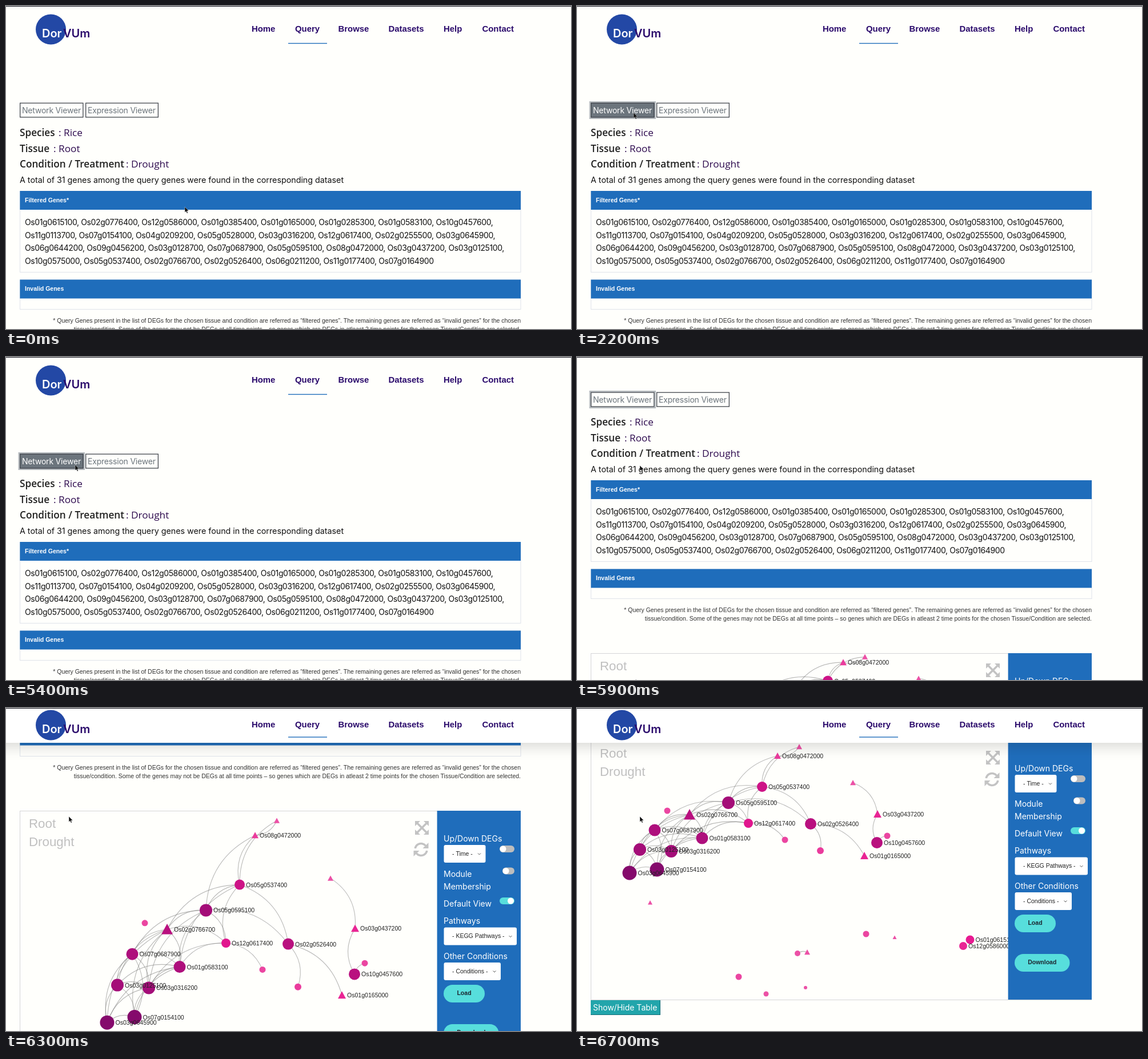
Recreate the animation shown at these times as an HTML page with a canvas. Size 989 by 566 pixels, loop 8000 ms.

```html
<!DOCTYPE html>
<html lang="en">
<head>
<meta charset="utf-8">
<title>Gene network viewer</title>
<style>
  html, body { margin: 0; width: 100%; height: 100%; overflow: hidden; background: #fffffc; }
  canvas { display: block; }
</style>
</head>
<body>
<canvas id="stage" width="989" height="566"></canvas>
<script>
const ctx = document.getElementById('stage').getContext('2d');
const LOOP = 8000, STEP = 100;
const ARIAL = '"Liberation Sans", Arial, sans-serif';
const ROUND = 'Inter, sans-serif';
const HUMAN = '"Open Sans", sans-serif';
const PAGE = '#fffffc', BLUE = '#1f6dbb', PURPLE = '#2a0a6b', GREY = '#6c757d', AQUA = '#57dedc';
const PANEL_TOP = 627, PANEL_HEIGHT = 454;

// Keys are [time, ...values]; values are linear between keys.
function track(keys, t) {
  if (t <= keys[0][0]) return keys[0].slice(1);
  const next = keys.findIndex(k => k[0] > t);
  if (next < 0) return keys[keys.length - 1].slice(1);
  const a = keys[next - 1], b = keys[next], p = (t - a[0]) / (b[0] - a[0]);
  return a.slice(1).map((v, i) => v + (b[i + 1] - v) * p);
}

const cursorKeys = [
  [600, 313, 352], [700, 271, 317], [800, 271, 317], [1000, 179, 246], [1100, 179, 246], [1800, 99, 187],
  [4500, 99, 187], [4800, 150, 176], [5100, 163, 208], [5400, 121, 189], [5500, 110, 190]
];
const scrollKeys = [[5800, 0], [5900, 108], [6100, 315], [6300, 447], [6500, 533], [6700, 570]];
const stickyKeys = [[6000, 0], [6100, 0.37], [6300, 1]];
// The network starts shifted right and stretched, then settles: [time, shift, stretch].
const settleKeys = [[5900, 115, 0.6], [6100, 130, 1.6], [6300, 85, 1.6], [6700, 0, 1]];

const circle = (x, y, r, gene) => ({ x, y, r, gene });
const triangle = (x, y, r, gene) => ({ x, y, r, gene, triangle: true });

const hubs = [
  circle(324, 81, 9, 'Os05g0537400'), circle(265, 109, 11, 'Os05g0595100'),
  triangle(197, 130, 10, 'Os02g0766700'), circle(300, 145, 8, 'Os12g0617400'),
  circle(136, 157, 10.5, 'Os07g0687900'), circle(219, 171, 10.5, 'Os01g0583100'),
  circle(110, 191, 11, 'Os03g0125100'), circle(165, 194, 11, 'Os03g0316200'),
  circle(140, 226, 12.5, 'Os07g0154100'), circle(92, 232, 12.5, 'Os03g0645900')
];
const top1 = triangle(351, 27, 6, 'Os08g0472000'), top2 = triangle(389, 11, 5);
const middle = circle(409, 146, 10, 'Os02g0526400'), right = triangle(503, 202, 7, 'Os01g0165000');
const leaf1 = circle(364, 174, 5.5), leaf2 = circle(426, 193, 6);
const branch = [
  triangle(483, 74, 5), triangle(526, 129, 7, 'Os03g0437200'),
  circle(525, 179, 10, 'Os10g0457600'), circle(543, 167, 5.5)
];
const pair = [circle(386, 373, 5), triangle(403, 371, 5)];
const strays = [
  circle(158, 123, 5.5), triangle(128, 284, 4), circle(506, 339, 5.5), triangle(556, 345, 3.5),
  circle(688, 349, 7.5, 'Os01g0615100'), circle(676, 360, 7, 'Os12g0586000'),
  circle(283, 414, 5.5), circle(331, 444, 4.5), circle(400, 433, 3)
];
const nodes = [...hubs, top1, top2, middle, right, leaf1, leaf2, ...branch, ...pair, ...strays];

const edges = [
  [hubs[1], top1], [hubs[0], top1], [top2, top1], [hubs[0], top2], [hubs[1], middle], [hubs[0], middle],
  [middle, right], [middle, leaf2], [hubs[3], leaf1],
  [branch[0], branch[1]], [branch[2], branch[1]], [branch[2], branch[3]], pair
];
// Neighbouring hubs are all linked, left to right.
for (const a of hubs) {
  for (const b of hubs) {
    if (a.x < b.x && Math.hypot(a.x - b.x, a.y - b.y) < 150) edges.push([a, b]);
  }
}

// Larger nodes are darker and closer to purple.
function nodeColor({ r }) {
  const size = Math.max(0, r - 5) / 7.5;
  return `hsl(${327 - 15 * size * size} ${80 + 6 * size}% ${62 - 34 * size}%)`;
}

const geneLines = [
  'Os01g0615100, Os02g0776400, Os12g0586000, Os01g0385400, Os01g0165000, Os01g0285300, Os01g0583100, Os10g0457600,',
  'Os11g0113700, Os07g0154100, Os04g0209200, Os05g0528000, Os03g0316200, Os12g0617400, Os02g0255500, Os03g0645900,',
  'Os06g0644200, Os09g0456200, Os03g0128700, Os07g0687900, Os05g0595100, Os08g0472000, Os03g0437200, Os03g0125100,',
  'Os10g0575000, Os05g0537400, Os02g0766700, Os02g0526400, Os06g0211200, Os11g0177400, Os07g0164900'
];
const notes = [
  '* Query Genes present in the list of DEGs for the chosen tissue and condition are referred as “filtered genes”. The remaining genes are referred as “invalid genes” for the chosen',
  'tissue/condition. Some of the genes may not be DEGs at all time points – so genes which are DEGs in atleast 2 time points for the chosen Tissue/Condition are selected.'
];

function text(str, x, y, font, color, align = 'left', spacing = 0) {
  ctx.font = font;
  ctx.fillStyle = color;
  ctx.textAlign = align;
  ctx.letterSpacing = spacing + 'px';
  ctx.fillText(str, x, y);
}

function rect(x, y, w, h, color) {
  ctx.fillStyle = color;
  ctx.fillRect(x, y, w, h);
}

function frame(x, y, w, h, color, width = 1) {
  ctx.strokeStyle = color;
  ctx.lineWidth = width;
  ctx.strokeRect(x + width / 2, y + width / 2, w - width, h - width);
}

function pill(x, y, w, h, r, color) {
  ctx.fillStyle = color;
  ctx.beginPath();
  ctx.roundRect(x, y, w, h, r);
  ctx.fill();
}

function disc(x, y, r, color) {
  ctx.fillStyle = color;
  ctx.beginPath();
  ctx.arc(x, y, r, 0, Math.PI * 2);
  ctx.fill();
}

function polygon(points, color) {
  ctx.fillStyle = color;
  ctx.beginPath();
  points.forEach(([x, y]) => ctx.lineTo(x, y));
  ctx.closePath();
  ctx.fill();
}

function at(x, y, draw) {
  ctx.save();
  ctx.translate(x, y);
  draw();
  ctx.restore();
}

function drawHeader(underlineY) {
  disc(78.5, 41, 26.5, '#2348a5');
  text('Dor', 63, 55, '600 20px ' + ROUND, '#fff');
  text('VUm', 100, 55, '600 20px ' + ROUND, PURPLE);
  const items = { Home: 430, Query: 506, Browse: 581.5, Datasets: 669.5, Help: 766, Contact: 833.5 };
  for (const name in items) text(name, items[name], 45, 'bold 14.9px ' + ARIAL, PURPLE);
  rect(494, underlineY, 68, 1.4, BLUE);
}

function drawStickyHeader(p) {
  if (!p) return;
  at(0, (p - 1) * 61, () => {
    ctx.globalAlpha = p;
    ctx.shadowColor = 'rgba(0,0,0,.16)';
    ctx.shadowBlur = 24;
    ctx.shadowOffsetY = 6;
    rect(-30, -30, 1049, 91, '#fff');
    ctx.shadowColor = 'transparent';
    ctx.translate(0, -11);
    drawHeader(61.3);
  });
}

function drawButton(label, x, w, cursor, focused) {
  const y = 169.5, h = 26;
  const hover = cursor.x >= x && cursor.x < x + w && cursor.y >= y && cursor.y < y + h;
  if (focused) rect(x - 2.5, y - 2.5, w + 5, h + 5, '#b5babe');
  rect(x, y, w, h, hover ? GREY : PAGE);
  frame(x, y, w, h, '#42464e', 1.3);
  text(label, x + 4, 188, '14px ' + ROUND, hover ? '#fff' : GREY, 'left', -0.2);
}

function drawTable(title, y, height) {
  frame(24, y, 877.5, height, '#dfe3ea');
  rect(24.4, y, 876.6, 33, BLUE);
  text(title, 33, y + 19.5, 'bold 10.5px ' + ARIAL, '#fff');
}

function drawResults(cursor, focused) {
  drawButton('Network Viewer', 24, 111.5, cursor, focused);
  drawButton('Expression Viewer', 139, 128, cursor, false);
  [['Species', ': Rice', 92], ['Tissue', ': Root', 83], ['Condition / Treatment', ': Drought', 210]]
    .forEach(([label, value, x], i) => {
      const y = 228 + i * 27.6;
      text(label, 24, y, '600 17.2px ' + HUMAN, '#212121');
      text(value, x, y, '17.2px ' + HUMAN, '#2d0a4e');
    });
  text('A total of 31 genes among the query genes were found in the corresponding dataset',
    24, 310, '14.27px ' + ROUND, '#111');
  drawTable('Filtered Genes*', 324, 143);
  geneLines.forEach((line, i) => text(line, 33, 384 + i * 22.6, '14px ' + ROUND, '#111', 'left', -0.39));
  drawTable('Invalid Genes', 479.5, 52.5);
  notes.forEach((line, i) => text(line, 901, 554.5 + i * 15.2, '10.47px ' + ARIAL, '#333', 'right'));
}

function drawGraph(t) {
  const [shift, stretch] = track(settleKeys, t);
  const place = n => [n.x + shift, n.y * stretch];
  const bend = 0.3;
  ctx.strokeStyle = 'rgba(130,130,130,.55)';
  ctx.lineWidth = 1.1;
  for (const [from, to] of edges) {
    const [ax, ay] = place(from), [bx, by] = place(to);
    ctx.beginPath();
    ctx.moveTo(ax, ay);
    ctx.quadraticCurveTo((ax + bx) / 2 + (by - ay) * bend, (ay + by) / 2 - (bx - ax) * bend, bx, by);
    ctx.stroke();
  }
  for (const n of nodes) {
    const [x, y] = place(n), { r } = n, base = y + r * 0.85;
    if (n.triangle) polygon([[x, y - r], [x + r, base], [x - r, base]], nodeColor(n));
    else disc(x, y, r, nodeColor(n));
  }
  for (const n of nodes) {
    const [x, y] = place(n);
    if (n.gene) text(n.gene, x + n.r + 2, y + 4, '10.55px ' + ARIAL, '#222');
  }
}

function drawIcons() {
  const color = '#c3c3c3';
  ctx.strokeStyle = color;
  ctx.lineWidth = 3.6;
  at(728, 30, () => {
    for (let i = 0; i < 4; i++) {
      ctx.beginPath();
      ctx.moveTo(0, 0);
      ctx.lineTo(9, 9);
      ctx.stroke();
      polygon([[12, 12], [12, 3], [3, 12]], color);
      ctx.rotate(Math.PI / 2);
    }
  });
  at(726.5, 68, () => {
    for (let i = 0; i < 2; i++) {
      ctx.beginPath();
      ctx.arc(0, 0, 10.5, Math.PI * 1.06, Math.PI * 1.78);
      ctx.stroke();
      polygon([[13, -12], [13, -2], [3, -2]], color);
      ctx.rotate(Math.PI);
    }
  });
}

function drawSelect(label, y, w) {
  pill(766.5, y, w, 31, 3, '#fff');
  text(label, 781, y + 18.5, '10.5px ' + ARIAL, '#222');
  const x = 766.5 + w - 11;
  ctx.strokeStyle = '#555';
  ctx.lineWidth = 1;
  ctx.beginPath();
  ctx.moveTo(x - 2.5, y + 14.5);
  ctx.lineTo(x, y + 17);
  ctx.lineTo(x + 2.5, y + 14.5);
  ctx.stroke();
}

function drawToggle(x, y, on) {
  pill(x, y - 6, 890 - x, 12, 6, on ? AQUA : '#bdbdbd');
  disc(on ? 883.5 : x + 6, y, 5.5, '#fff');
}

function drawAction(label, y, w) {
  pill(766, y, w, 31, 15.5, AQUA);
  text(label, 766 + w / 2, y + 17.5, 'bold 10.5px ' + ARIAL, '#1c2630', 'center');
}

function drawSidebar() {
  rect(754.6, 0, 146.4, PANEL_HEIGHT, BLUE);
  const labels = {
    'Up/Down DEGs': 54, 'Module': 116, 'Membership': 138, 'Default View': 168, 'Pathways': 198, 'Other Conditions': 260
  };
  for (const label in labels) text(label, 766, labels[label], '14px ' + ROUND, '#fff');
  drawSelect('- Time -', 60, 73);
  drawSelect('- KEGG Pathways -', 204.5, 127.5);
  drawSelect('- Conditions -', 266, 99.5);
  drawToggle(864, 67, false);
  drawToggle(869, 105.5, false);
  drawToggle(864, 158, true);
  drawAction('Load', 305, 72);
  drawAction('Download', 374, 96.5);
}

function drawPanel(t) {
  ctx.save();
  ctx.beginPath();
  ctx.rect(24, 0, 731, PANEL_HEIGHT);
  ctx.clip();
  text('Root', 40, 30, '22.3px ' + ARIAL, '#c0c0c0');
  text('Drought', 40, 62, '22.3px ' + ARIAL, '#c0c0c0');
  drawGraph(t);
  drawIcons();
  ctx.restore();
  frame(24, 0, 877, PANEL_HEIGHT + 1, '#d5d5d8');
  drawSidebar();
  rect(24, 455, 122, 26, '#176f78');
  rect(24, 455, 121, 25, '#22a5ab');
  text('Show/Hide Table', 28, 472.5, '14px ' + ROUND, '#fff');
}

function drawCursor(x, y) {
  at(x, y, () => {
    polygon([[0, 0], [0, 9.6], [2.2, 7.7], [3.8, 11.2], [5.3, 10.5], [3.8, 7.1], [6.8, 6.9]], '#111');
    ctx.strokeStyle = 'rgba(255,255,255,.6)';
    ctx.lineWidth = 0.6;
    ctx.stroke();
  });
}

function draw(t) {
  const [x, y] = track(cursorKeys, t);
  const [scroll] = track(scrollKeys, t);
  rect(0, 0, 989, 566, PAGE);
  at(0, -scroll, () => {
    drawHeader(64.8);
    drawResults({ x, y: y + scroll }, t >= 2200);
    at(0, PANEL_TOP, () => drawPanel(t));
  });
  drawStickyHeader(track(stickyKeys, t)[0]);
  rect(0, 0, 989, 1, '#16161f');
  drawCursor(x, y);
}

const start = performance.now();
function tick() {
  const t = (performance.now() - start) % LOOP;
  draw(Math.floor(t / STEP) * STEP);
  requestAnimationFrame(tick);
}
tick();
</script>
</body>
</html>
```
